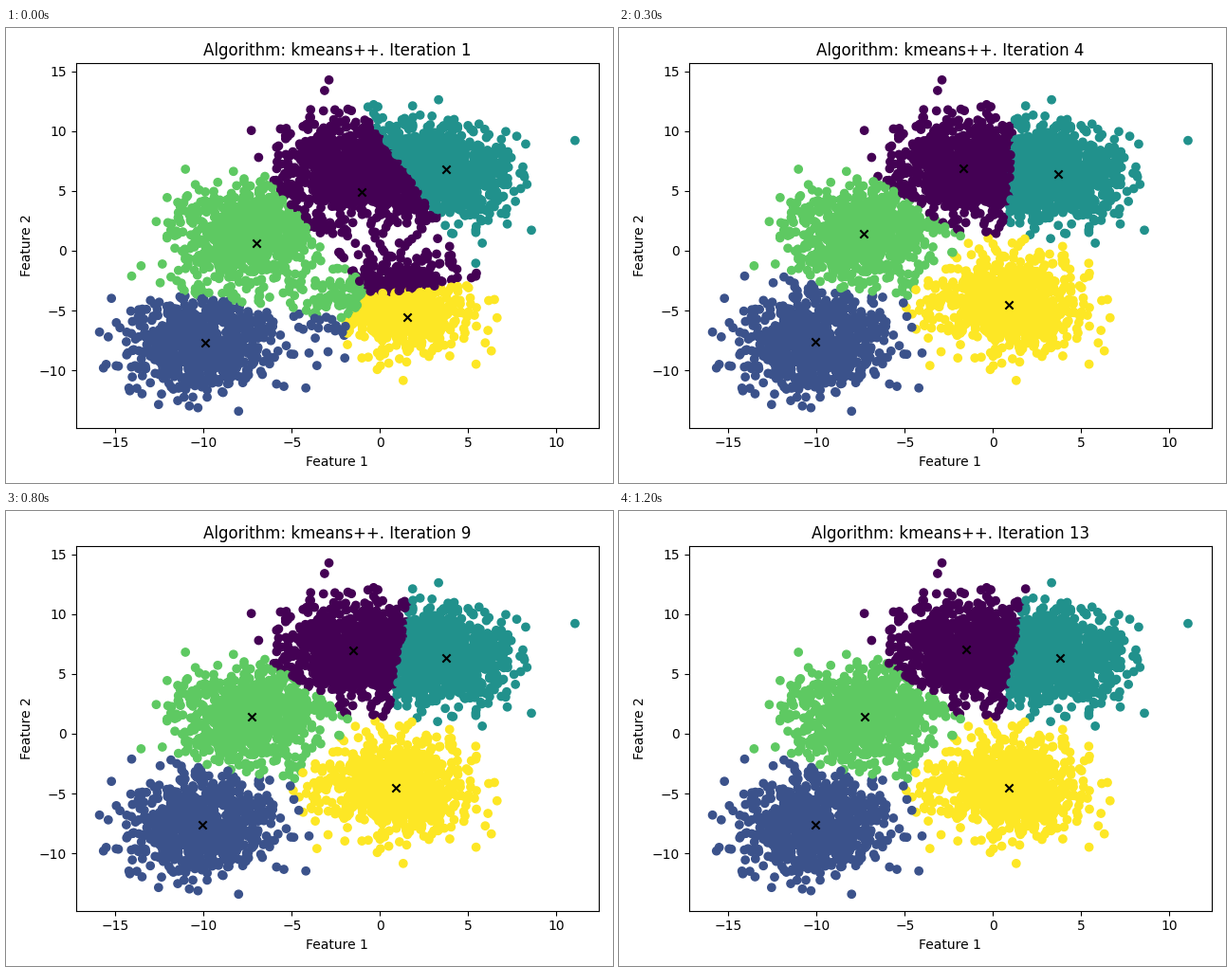
These frames come from a looping animation (640 by 480 pixels, 1300 ms). A matplotlib script:

```python
import numpy as np
import matplotlib.pyplot as plt
from matplotlib.animation import FuncAnimation

STEPS = 13
K = 5
PER_BLOB = 800
SPREAD = 2.0
SEEDS = np.array([
    [0.65, 0.50],
    [-5.82, -7.22],
    [6.76, 3.51],
    [-4.72, -2.75],
    [1.92, -7.22],
])


def make_blobs():
    rng = np.random.RandomState(100)
    hubs = rng.uniform(-10, 10, (K, 2))
    pts = np.concatenate([rng.normal(h, SPREAD, (PER_BLOB, 2)) for h in hubs])
    order = np.arange(len(pts))
    rng.shuffle(order)
    return pts[order]


def lloyd(pts, centers, steps):
    """Return (labels, centroids) after each k-means iteration."""
    history = []
    for _ in range(steps):
        dist = ((pts[:, None] - centers) ** 2).sum(axis=2)
        labels = dist.argmin(axis=1)
        centers = np.array([pts[labels == k].mean(axis=0) for k in range(K)])
        history.append((labels, centers))
    return history


points = make_blobs()
history = lloyd(points, SEEDS, STEPS)

fig, ax = plt.subplots(figsize=(6.4, 4.8), dpi=100)
labels, centers = history[0]
cloud = ax.scatter(*points.T, c=labels, cmap="viridis", vmin=0, vmax=K - 1)
marks = ax.scatter(*centers.T, c="black", marker="x")
ax.set_xlabel("Feature 1")
ax.set_ylabel("Feature 2")
title = ax.set_title("Algorithm: kmeans++. Iteration 1")
fig.tight_layout()


def draw(i):
    labels, centers = history[i]
    cloud.set_array(labels)
    marks.set_offsets(centers)
    title.set_text(f"Algorithm: kmeans++. Iteration {i + 1}")
    return cloud, marks, title


anim = FuncAnimation(fig, draw, frames=STEPS, interval=100, repeat=True)
plt.show()
```
